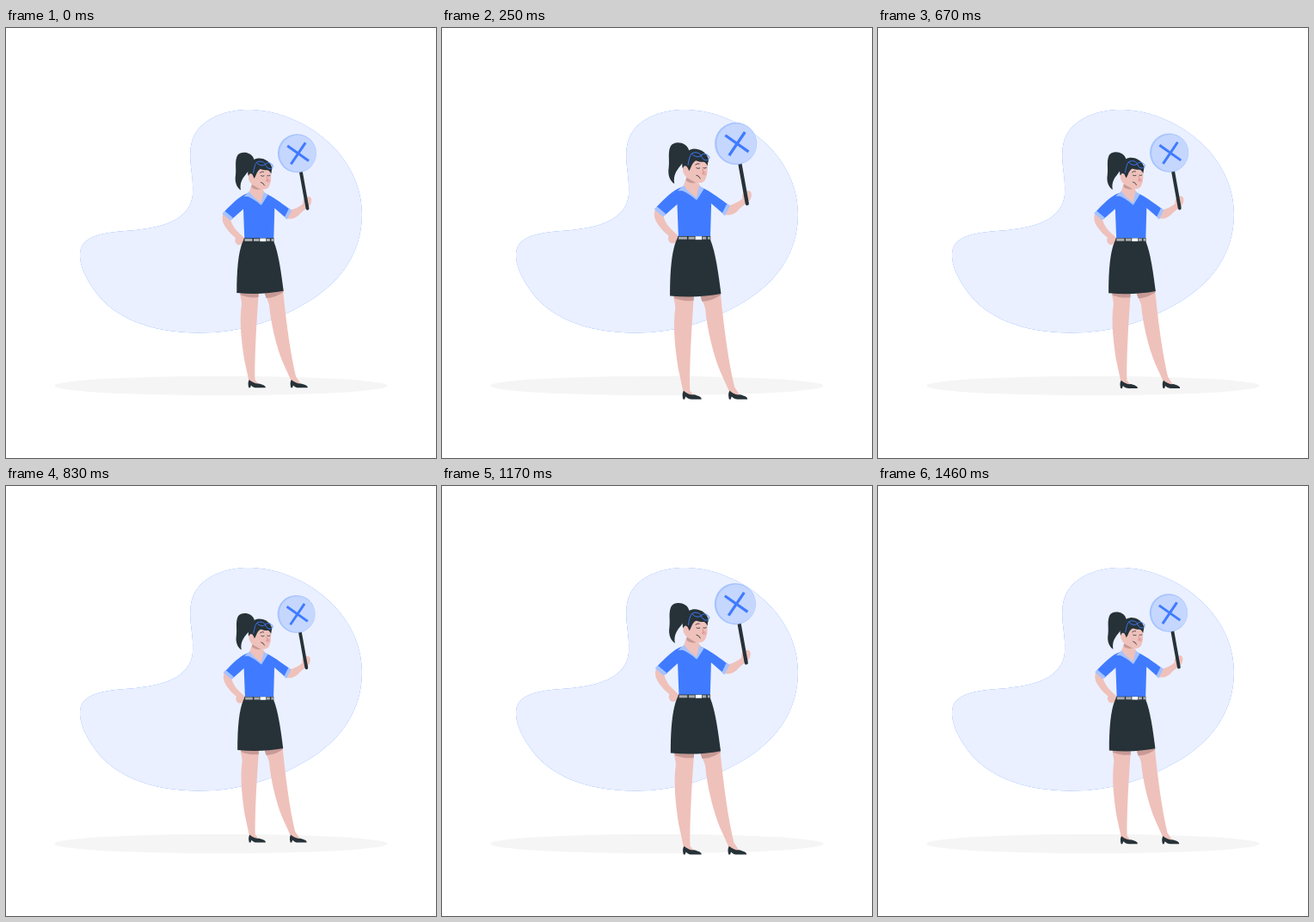
Write an HTML page that moves like this. It is 500 by 500 pixels and loops after 1.5 s.

```html
<!DOCTYPE html>
<html lang="en">
<head>
<meta charset="utf-8">
<title>Woman with a cross sign</title>
<style>
html, body { margin: 0; width: 100%; height: 100%; overflow: hidden; background: #fff; }
svg { display: block; width: 100vw; height: 100vh; }
.blue { fill: #407bff; }
.pale { fill: #a6c3ff; }
.skin { fill: #efc1bb; }
.shade { fill: #c89a96; }
.dark { fill: #263238; }
.line { fill: none; stroke-linecap: round; stroke-linejoin: round; }
</style>
</head>
<body>
<svg viewBox="0 0 500 500">
  <defs>
    <path id="blob" d="M86 262C88 243 107 238 145 235.5C185 232 214 222 217 194C219 170 209 148 218 127C228 104 258 94 286 95C350 98 414 150 414 216C414 265 385 300 345 322C310 342 270 354.500 225 354.500C165 354.500 125 335 105 308C93 292 85 275 86 262Z"/>
    <path id="shoe" d="M282.800 409C281 412 281.600 415 282.300 418.200H284L285 415.300C287 417.500 289 418.200 291.500 418.200H301.800C302.200 415.800 299 414.800 294 413.300C291 413.800 287 412.500 282.800 409Z"/>
  </defs>

  <use href="#blob" class="blue"/>
  <use href="#blob" fill="#fff" opacity=".89"/>
  <ellipse cx="249.800" cy="416" rx="193.700" ry="11.200" fill="#f5f5f5"/>

  <g id="woman">
    <!-- legs -->
    <g class="skin">
      <path d="M272 306C272 312 274 316 274 321C271 341 274 365 277 385L282.300 409.500C285 413 290 415 293.500 413.600L289.500 409C289 385 291 345 294 306Z"/>
      <path d="M300 306C302 313 305 317 306 322C308 345 315 372 322 389L331.300 409.500C334 413 339 415 342.500 413.600L337 405C331 380 326 345 322 304Z"/>
    </g>
    <path class="shade" d="M272 306L273 310.500C280 313 287 314 293.500 313L294 306ZM300 306L302.500 314C310 314 317 311 322.500 307L322 303Z"/>
    <use href="#shoe" class="dark"/>
    <use href="#shoe" class="dark" x="49"/>

    <!-- arms -->
    <g class="skin">
      <path d="M252.500 216C250.500 222 252 226 255 231C259 237 263 241 267 244C265 248 268 253 272 252C275 251 278 249 278 245C274 241 269 237 266 233C263 228 261 225 261.500 220Z"/>
      <path d="M329 212.500C337 210 343 207 345.500 204C344.500 200 347 196.500 351 196C356 195.500 356 202 353.500 206C350 210 345 212 340 218C335 222 331 222.500 326 221.500Z"/>
    </g>

    <!-- clothes -->
    <path class="blue" d="M280 192.500C272 195 262 205 253.500 214L262.500 222.500L276 210.500L277.300 245H311.300L312.300 209.500L325.500 221L331 211.300C322 205 313 198 306 194.500L301 192Z"/>
    <path class="pale" d="M254.300 212.700L251.500 215.700L260.800 223.800L264 220.800ZM329 209.700L332.300 211.800L326.800 222.800L323.800 220.200Z"/>
    <path class="skin" d="M283 190L286 181L297 186L300.500 190.500L297 204.500C290 199 285 196 283 190Z"/>
    <path class="pale" d="M276.500 196L283 190C286 195.500 291 199 297 204L296.500 206C291 201 286 198 281.500 196ZM299.500 190.500L304.500 194L297 206L296.500 203.500Z"/>
    <path class="dark" d="M275.500 248C270 260 268.200 283 268.300 308C288 309.800 306 309 322.700 305.800C320 285 317 262 311.300 248Z"/>
    <path class="dark" d="M276.800 244.300H311.500V248.600H275.500Z"/>
    <path fill="#a9abac" d="M277.500 245H286.500V247.900H277.500ZM288 245H294.500V247.900H288ZM303 245H307V247.900H303ZM308.500 245H311V247.900H308.500Z"/>
    <rect x="295.300" y="244.600" width="7" height="3.600" fill="#fff"/>

    <!-- head -->
    <path class="dark" d="M288.500 153C286 143.500 272 142.500 268.700 149C265.800 156 268 163 267 171C265.500 180 269 186 273 188.500C271.500 180 275 175 279 170C284 164 288.500 158 288.500 153Z"/>
    <path class="dark" d="M281.500 171C280 160.500 284 153 293 151.500C301 151 308 156 309.500 163L308 169L296 178L285 177Z"/>
    <path class="skin" d="M288 168C290 165 291 162 292 160C295 165 301 166 307.500 165C309 171 308.500 180 305.500 185C302 189.500 294 188.500 287 182C284 181 281.500 176 282 173C282.500 168.500 286 168 288 173Z"/>
    <path class="shade" d="M286 182L296 187.700C291 188.500 287.500 187 285.500 185Z"/>
    <path class="dark" d="M292 157C297 155 305 157 308.700 163.500L308.300 169.500C307 166.500 304.500 164.500 301 163.500C298 162.500 295 164 293 166.500C291 169 290.300 173 288.500 175L286 168Z"/>
    <circle cx="305" cy="177.500" r="2.300" fill="#e89ca5" opacity=".55"/>
    <g class="line" stroke="#263238" stroke-width=".8">
      <path d="M295.500 168.300Q297.500 166.500 299.500 167.300M296.500 171.800Q298 173 300 172M304 171.800Q305.500 172.600 307 171.500M296.500 179.500Q299.500 180 300.500 183"/>
      <path d="M303 173L304.500 177.500L302.500 177.600" stroke="#d58b87"/>
    </g>
    <path class="line" stroke="#407bff" stroke-width=".9" d="M287.500 168.500C288.500 163 289.500 158.500 291.500 156.500C295 154 300 155.500 301.500 158.500C299 161 294 160 291.500 156.500M301.500 158.500C304 155.500 308.500 156.500 310.300 160.500C310 163.500 306.500 164.500 304 162.500C302.500 161.300 301.800 160 301.500 158.500"/>

    <!-- sign -->
    <path class="line" stroke="#263238" stroke-width="3.900" d="M342.800 167L350.500 209.800"/>
    <circle class="pale" cx="338.400" cy="145.800" r="22.500"/>
    <circle cx="339.300" cy="145.900" r="21.300" fill="#c5d7ff"/>
    <path class="line" stroke="#407bff" stroke-width="3" style="stroke-linecap:butt" d="M327.200 137L352 154.500M348.200 133.500L331.300 158.500"/>
  </g>
</svg>
<script>
const LOOP = 1500, START = 825, LOW = 0.973, HIGH = 1.093;
const CENTER = [303.5, 270.5];
// [share of the loop, height of the beat]
const beat = [[0, 0], [0.19, 1], [0.4, 0], [0.62, 1], [1, 0]];
const woman = document.getElementById('woman');

function beatAt(p) {
  const i = beat.findIndex(([at]) => at > p);
  const [a, from] = beat[i - 1], [b, to] = beat[i];
  return from + (to - from) * (p - a) / (b - a);
}

function draw() {
  const p = (performance.now() - START + LOOP) % LOOP / LOOP;
  const scale = LOW + (HIGH - LOW) * beatAt(p);
  const [x, y] = CENTER;
  woman.setAttribute('transform', `translate(${x} ${y}) scale(${scale}) translate(${-x} ${-y})`);
  requestAnimationFrame(draw);
}
draw();
</script>
</body>
</html>
```
